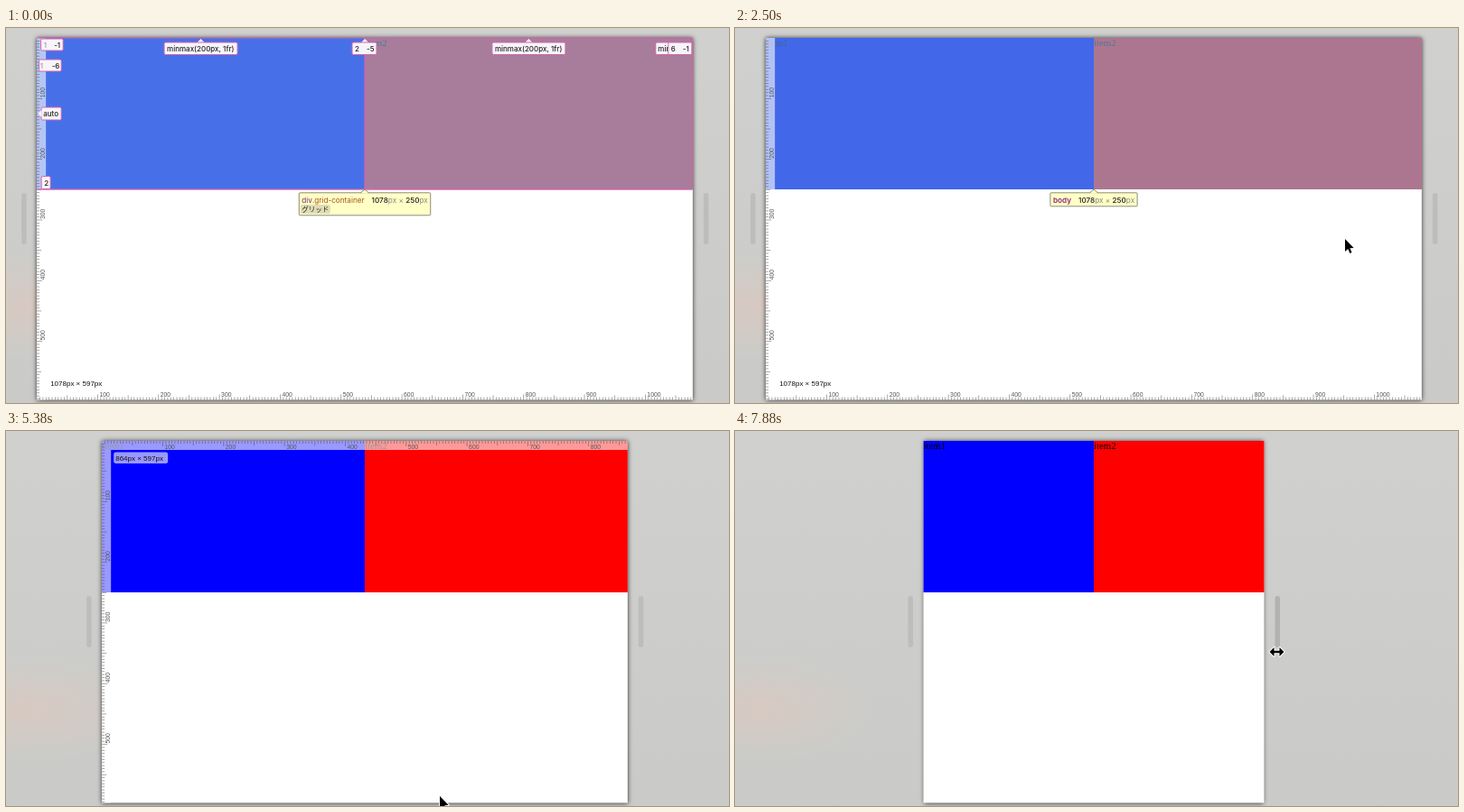
An HTML page with a canvas for the animation above (8000 ms loop, 800 by 416 pixels).

```html
<!DOCTYPE html>
<html lang="ja">
<head>
<meta charset="utf-8">
<style>
html, body { margin: 0; width: 100%; height: 100%; overflow: hidden; }
canvas { display: block; }
</style>
</head>
<body>
<canvas id="stage" width="800" height="416"></canvas>
<script>
const ctx = document.getElementById('stage').getContext('2d');
const LOOP = 8000, STEP = 125;
const SCALE = 0.6732, CENTER = 397, TOP = 11, BOTTOM = 412.5, ROW = 179;
const UI = 'Inter, "Noto Sans CJK JP", sans-serif';
const PINK = '#d763ad';

// [time, viewport width in CSS px]
const widths = [[3125, 1078], [3625, 979], [4000, 874], [4250, 864], [6125, 864],
  [6625, 811], [7000, 736], [7875, 560]];

// [time, hovered element]
const hovers = [[0, 'grid'], [500, 'body'], [1125, 'head'], [1875, 'body'], [2750, ''],
  [4500, 'body'], [4875, 'grid'], [5375, 'head'], [5625, '']];

// [time, x, y] of the free pointer
const pointerIn = [[2500, 675, 234], [2750, 728, 224], [3000, 770, 214]];
const pointerOut = [[4250, 699, 214], [4375, 660, 320], [4500, 620, 405]];
const pointerBack = [[5375, 480, 405], [5625, 575, 335], [5875, 655, 265], [6125, 699, 236]];
const gripY = [[3000, 214], [4250, 214], [6125, 236], [6625, 236], [7875, 245]];

function sample(keys, t, column = 1) {
  let i = 0;
  while (i < keys.length - 1 && keys[i + 1][0] <= t) i++;
  const a = keys[i], b = keys[i + 1];
  if (!b || t <= a[0]) return a[column];
  return a[column] + (b[column] - a[column]) * (t - a[0]) / (b[0] - a[0]);
}

function rect(x, y, w, h, color) {
  ctx.fillStyle = color;
  ctx.fillRect(x, y, w, h);
}

function round(x, y, w, h, r, fill, stroke) {
  ctx.beginPath();
  ctx.roundRect(x, y, w, h, r);
  ctx.fillStyle = fill;
  ctx.fill();
  if (stroke) {
    ctx.strokeStyle = stroke;
    ctx.lineWidth = 1;
    ctx.stroke();
  }
}

function text(str, x, y, font, color, align = 'left') {
  ctx.font = font;
  ctx.fillStyle = color;
  ctx.textAlign = align;
  ctx.fillText(str, x, y);
  return x + ctx.measureText(str).width;
}

function polygon(points, fill) {
  ctx.beginPath();
  points.forEach(([x, y]) => ctx.lineTo(x, y));
  ctx.closePath();
  ctx.fillStyle = fill;
  ctx.fill();
}

function backdrop() {
  const g = ctx.createLinearGradient(0, 0, 0, 416);
  g.addColorStop(0, '#d0d1ce');
  g.addColorStop(0.5, '#cdcecb');
  g.addColorStop(1, '#cacbc8');
  rect(0, 0, 800, 416, g);
  ctx.save();
  ctx.translate(25, 308);
  ctx.scale(2.2, 1);
  const glow = ctx.createRadialGradient(0, 0, 0, 0, 0, 58);
  glow.addColorStop(0, 'rgba(217,201,193,.9)');
  glow.addColorStop(1, 'rgba(217,201,193,0)');
  rect(-60, -60, 120, 120, glow);
  ctx.restore();
}

function page(left, right, dragging) {
  round(left - 17, 183, 5.5, 57, 2.7, '#bdbebc');
  round(right + 12, 183, 5.5, 57, 2.7, dragging ? '#b2b3b1' : '#bdbebc');
  ctx.save();
  ctx.shadowColor = 'rgba(0,0,0,.75)';
  ctx.shadowBlur = 5;
  rect(left, TOP, right - left, BOTTOM - TOP, '#fff');
  ctx.restore();
  rect(left, TOP, CENTER - left, ROW - TOP, '#00f');
  rect(CENTER, TOP, right - CENTER, ROW - TOP, '#f00');
  const serif = '10.8px "Liberation Serif", serif';
  text('item1', left, 20, serif, '#000');
  text('item2', CENTER, 20, serif, '#000');
}

function ruler(length, atEnd) {
  for (let n = 5; n * SCALE < length; n += 5) {
    const size = n % 100 === 0 ? 6 : n % 50 === 0 ? 5 : 3;
    rect(n * SCALE - 0.35, atEnd ? -size : 0, 0.7, size, 'rgba(70,70,70,.65)');
  }
}

function rulers(left, right, atTop, width) {
  const band = 'rgba(255,255,255,.6)', small = '6.8px "Liberation Sans", sans-serif';
  const span = right - left, height = BOTTOM - TOP, ink = '#555';
  if (atTop) rect(left, TOP, span, 10, band);
  rect(left, atTop ? TOP + 10 : TOP, 10, height - (atTop ? 10 : 0), band);

  ctx.save();
  ctx.translate(left, atTop ? TOP : BOTTOM);
  ruler(span, !atTop);
  for (let n = 100; n < width - 10; n += 100) text(n, n * SCALE + 2, atTop ? 8.5 : -4, small, ink);
  ctx.restore();

  ctx.save();
  ctx.translate(left, TOP);
  ctx.rotate(Math.PI / 2);
  ctx.scale(1, -1);
  ruler(height, false);
  ctx.restore();
  for (let n = 100; n < 597; n += 100) {
    ctx.save();
    ctx.translate(left + 9.3, TOP + n * SCALE - 1);
    ctx.rotate(-Math.PI / 2);
    text(n, 0, 0, small, ink);
    ctx.restore();
  }

  const y = atTop ? 23.5 : 387.5;
  round(left + 13, y, 60, 12.5, 2.5, 'rgba(255,255,255,.6)');
  text(`${width}px × 597px`, left + 15, y + 9, '8px "Liberation Sans", sans-serif', '#111');
}

function tint(left, right, grid) {
  ctx.save();
  ctx.globalAlpha = 0.66;
  rect(left, TOP, CENTER - left, ROW - TOP, grid ? '#6daadc' : '#659ddc');
  rect(CENTER, TOP, right - CENTER, ROW - TOP, grid ? '#7bbdeb' : '#82b3dc');
  ctx.restore();
}

function tag(x, y, w, h, parts) {
  round(x, y, w, h, 1.5, '#f8f5fa', PINK);
  parts.forEach(([str, dx, color = '#222']) =>
    text(str, x + dx, y + h / 2 + 3, `500 8px ${UI}`, color));
}

function gridLabels(left, right, width) {
  const last = Math.floor(width / 200) + 1;
  rect(left, TOP - 0.5, right - left, 1, PINK);
  rect(left, ROW - 0.5, right - left, 1.2, PINK);
  rect(CENTER - 0.6, TOP, 1.2, ROW - TOP, PINK);
  rect(right - 1, TOP, 1, ROW - TOP, PINK);

  for (const x of [(left + CENTER) / 2, (CENTER + right) / 2, CENTER]) {
    polygon([[x, TOP + 1], [x + 4, 16], [x - 4, 16]], '#f8f5fa');
  }
  for (const x of [(left + CENTER) / 2, (CENTER + right) / 2]) {
    tag(x - 40.5, 16, 81, 13.5, [['minmax(200px, 1fr)', 3]]);
  }
  tag(CENTER - 14, 16, 27, 13.5, [['2', 3], [`-${last - 1}`, 16]]);
  tag(right - 41, 16, 20, 13.5, [['min', 2.5]]);
  tag(right - 27, 16, 26, 13.5, [[last, 3], ['-1', 16]]);

  tag(left + 4.5, 12, 24.5, 13, [['1', 3, '#999'], ['-1', 14.5]]);
  tag(left + 2.5, 35, 24.5, 13, [['1', 1, '#999'], [`-${last}`, 14]]);
  tag(left + 5, 88, 22, 14, [['auto', 2]]);
  polygon([[left + 1, 95], [left + 5.5, 91], [left + 5.5, 99]], '#f8f5fa');
  tag(left + 5, 164.5, 10, 14, [['2', 3]]);
}

function tooltip(kind, width) {
  const plain = `8.2px ${UI}`, strong = `600 8.2px ${UI}`, medium = `500 8.2px ${UI}`;
  const grid = kind === 'grid', gray = '#888';
  const runs = [
    ...(grid ? [['div', plain, '#7a2a72'], ['.grid-container', plain, '#a9551b']]
      : [['body', strong, '#8d2b80']]),
    [null], [width, medium, '#222'], ['px × ', plain, gray], ['250', medium, '#222'], ['px', plain, gray]
  ];
  let total = 0;
  for (const [str, font] of runs) {
    ctx.font = font || plain;
    total += str === null ? 8 : ctx.measureText(str).width;
  }
  const x = CENTER - total / 2 - 3, h = grid ? 25 : 15;
  round(x, 182.8, total + 6, h, 1, '#ffffc6', '#8c8c78');
  polygon([[CENTER, 179], [CENTER + 4.5, 183.4], [CENTER - 4.5, 183.4]], '#ffffc6');
  ctx.beginPath();
  ctx.moveTo(CENTER - 4.5, 182.8);
  ctx.lineTo(CENTER, 179);
  ctx.lineTo(CENTER + 4.5, 182.8);
  ctx.stroke();
  let pen = x + 3;
  for (const [str, font, color] of runs) {
    pen = str === null ? pen + 8 : text(str, pen, 193.8, font, color);
  }
  if (grid) {
    round(x + 1.5, 196, 33, 10, 2, '#deddb4');
    text('グリッド', x + 3, 204, '7.5px "Noto Sans CJK JP", sans-serif', '#222');
  }
}

function cursor(x, y, points) {
  ctx.save();
  ctx.translate(x, y);
  ctx.beginPath();
  points.forEach(([px, py]) => ctx.lineTo(px, py));
  ctx.closePath();
  ctx.lineJoin = 'round';
  ctx.strokeStyle = '#fff';
  ctx.lineWidth = 2;
  ctx.stroke();
  ctx.fillStyle = '#000';
  ctx.fill();
  ctx.restore();
}

const arrow = [[0, 0], [0, 14], [3.2, 11], [5.4, 16], [7.5, 15.1], [5.4, 10.2], [9.7, 10]];
const half = [[-3, -1.3], [-3, -5], [-8, 0], [-3, 5], [-3, 1.3]];
const resize = [...half, ...half.map(([x, y]) => [-x, -y])];

function pointer(t, right) {
  const path = [pointerIn, pointerOut, pointerBack]
    .find(p => t >= p[0][0] && t < p[p.length - 1][0] + (p === pointerOut ? STEP : 0));
  if (path) {
    cursor(sample(path, t, 1), sample(path, t, 2), arrow);
  } else if ((t >= 3000 && t < 4250) || t >= 6125) {
    const lag = t > 7000 ? 14 : 11.5;
    cursor(right + lag, sample(gripY, t), resize);
  }
}

function draw(t) {
  const width = Math.round(sample(widths, t));
  const left = CENTER - width * SCALE / 2, right = CENTER + width * SCALE / 2;
  const hover = hovers.findLast(h => h[0] <= t)[1];
  backdrop();
  page(left, right, (t >= 3000 && t < 4250) || t >= 6125);
  if (hover) {
    const atTop = hover === 'head';
    if (!atTop) tint(left, right, hover === 'grid');
    rulers(left, right, atTop, width);
    if (hover === 'grid') gridLabels(left, right, width);
    if (!atTop) tooltip(hover, width);
  }
  pointer(t, right);
}

function tick() {
  draw(Math.floor(performance.now() % LOOP / STEP) * STEP);
  requestAnimationFrame(tick);
}
tick();
</script>
</body>
</html>
```
